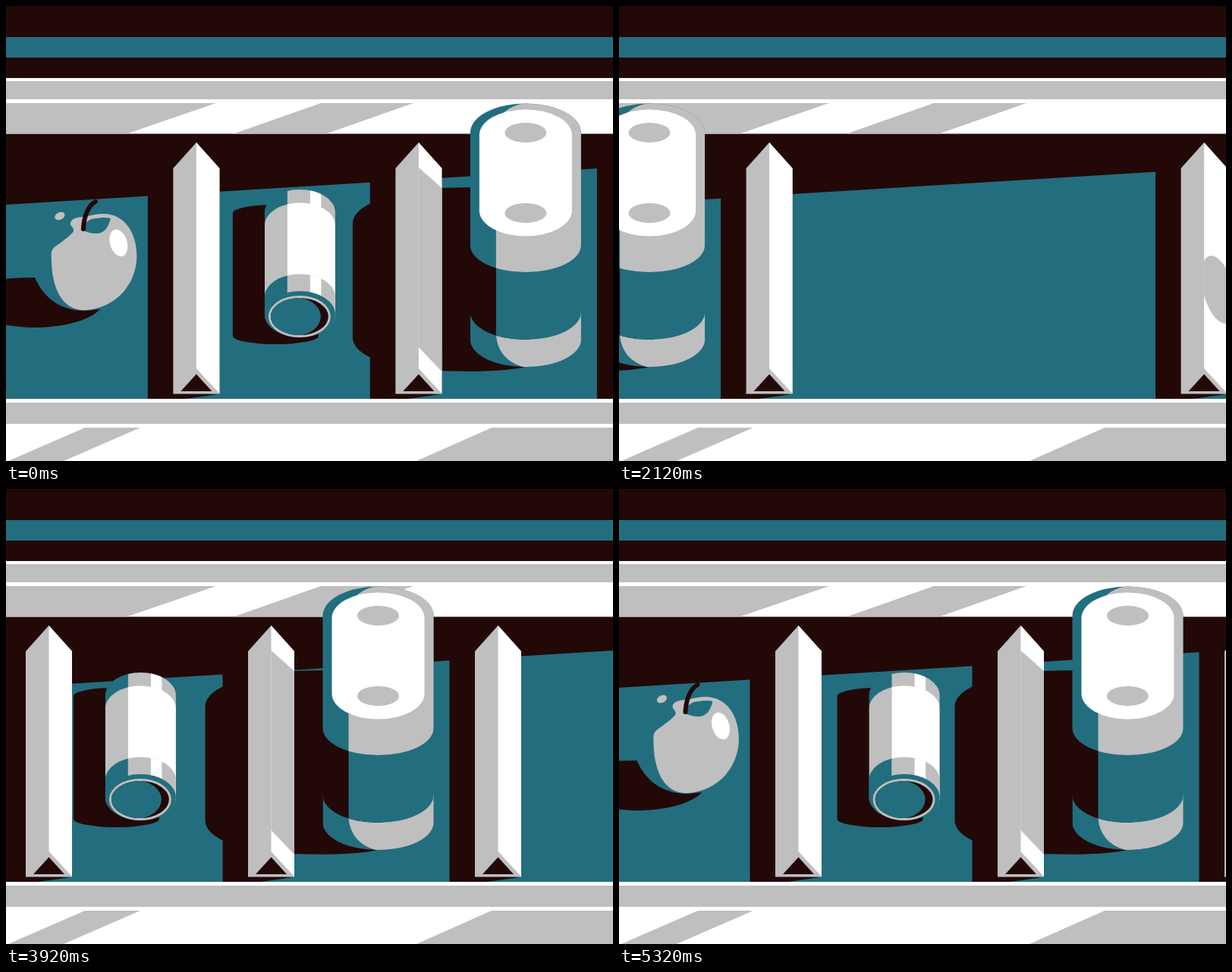
These frames come from a looping animation (800x600 px, 5.36 s). An HTML page with a canvas:

```html
<!DOCTYPE html>
<html lang="en">
<head>
<meta charset="utf-8">
<title>Checkout belt</title>
<style>
html, body { margin: 0; width: 100%; height: 100%; overflow: hidden; background: #230808; }
canvas { display: block; width: 800px; height: 600px; }
</style>
</head>
<body>
<canvas id="stage" width="800" height="600"></canvas>
<script>
const g = document.getElementById('stage').getContext('2d');
const DARK = '#230808', TEAL = '#226e7e', GRAY = '#bfbfbf', WHITE = '#ffffff';
const LOOP = 5360, TICK = 40, REST = 4480;
const MOVE = 393.5, EXIT = 710, ENTER = 356.5, SLIP = 84;

const part = (t, from, to) => Math.min(1, Math.max(0, (t - from) / (to - from)));

// Speeds up over the share a, cruises, slows down over the share b
function ramp(t, from, to, a = .5, b = .5) {
  const u = part(t, from, to), v = 1 / (1 - (a + b) / 2);
  if (u < a) return v * u * u / 2 / a;
  if (u > 1 - b) return 1 - v * (1 - u) ** 2 / 2 / b;
  return v * (u - a / 2);
}

// Belt position, slide of the can and roll of the apple
function pose(t) {
  const move = ramp(t, -789, 756, .32, .26);
  const exit = ramp(t, 1690, 2240, .5, .3);
  const enter = 1 - (1 - part(t, 2240, 3500)) ** 1.79;
  const rollBack = ramp(t, 940, 1680), rollAgain = ramp(t, 3624, 4364);
  const slip = ramp(t, 1640, 3440, .32, .26);
  return {
    x: 56.5 + MOVE * move + EXIT * exit + ENTER * enter,
    can: 178 - SLIP * (move - rollBack + slip - rollAgain),
    apple: -10 * (rollBack - exit)
  };
}

function rect(color, x, y, w, h) {
  g.fillStyle = color;
  g.fillRect(x, y, w, h);
}
function poly(color, ...p) {
  g.fillStyle = color;
  g.beginPath();
  for (let i = 0; i < p.length; i += 2) g.lineTo(p[i], p[i + 1]);
  g.fill();
}
function shape(color, d) {
  g.fillStyle = color;
  g.fill(new Path2D(d));
}
function oval(color, x, y, rx, ry, turn = 0) {
  g.fillStyle = color;
  g.beginPath();
  g.ellipse(x, y, rx, ry, turn, 0, 7);
  g.fill();
}
// Upright tube between two ellipse centres
function tubePath(x, top, bottom, rx, ry) {
  g.beginPath();
  g.ellipse(x, top, rx, ry, 0, Math.PI, 2 * Math.PI);
  g.ellipse(x, bottom, rx, ry, 0, 0, Math.PI);
  g.closePath();
}
function tube(color, ...size) {
  g.fillStyle = color;
  tubePath(...size);
  g.fill();
}
function inTube(size, draw) {
  g.save();
  tubePath(...size);
  g.clip();
  draw();
  g.restore();
}
function shifted(x, draw) {
  g.save();
  g.translate(x, 0);
  draw();
  g.restore();
}

function glare(left, right, top, bottom, lean) {
  poly(GRAY, left, top, right, top, right - lean, bottom, left - lean, bottom);
}
function backdrop() {
  rect(DARK, 0, 0, 800, 600);
  rect(TEAL, 0, 41, 800, 27);
  rect(WHITE, 0, 95, 800, 73.5);
  rect(GRAY, 0, 99, 800, 24);
  glare(-100, 277, 128, 168.5, 118);
  glare(415, 537, 128, 168.5, 115);
  poly(TEAL, 0, 262, 800, 213, 800, 518, 0, 518);
  rect(WHITE, 0, 518, 800, 82);
  rect(GRAY, 0, 523, 800, 28);
  glare(104, 177, 556, 600, 101);
  glare(640, 920, 556, 600, 99);
}

function barShadow() {
  rect(DARK, -64, 200, 40, 318);
  poly(DARK, -64, 518, -14, 518, 29, 512, -30, 508);
}
function bar(shaded) {
  poly(GRAY, 0, 180, 30.5, 214, 30.5, 511.5, -30.5, 511.5, -30.5, 214);
  poly(WHITE, 0, 180, 30.5, 214, 30.5, 511, 0, 478);
  if (shaded) poly(GRAY, 0, 213, 30.5, 240, 30.5, 482, 0, 450);
  poly(DARK, 0, 485.5, 20.5, 508, -20.5, 508);
}
// Casts a shadow on the lit face of a bar
function onFace(barX, x, draw) {
  g.save();
  g.beginPath();
  g.rect(barX, 214, 30.5, 280);
  g.clip();
  shifted(x, draw);
  g.restore();
}

function appleShadow() {
  shape(DARK, 'M-78 358 C-68 380 -50 401 -12 402 L8 400 C-8 416 -42 424 -82 424 ' +
    'Q-118 422 -132 416 L-160 400 L-140 364 Q-118 358 -78 358Z');
}
function apple(turn) {
  g.translate(0, 338);
  g.rotate(turn);
  g.translate(0, -338);
  shape(GRAY, 'M-56 332 C-57 322 -54 319 -48 315 C-38 308 -29 301 -27 297 ' +
    'C-26 291 -31 292 -31 286 C-29 279 -20 278 -11 278 C-4 276 4 274 14 274 ' +
    'C40 275 56.5 298 56.5 330 C56 365 32 397 -10 401 C-44 403 -56 368 -56 332Z');
  shape(TEAL, 'M-14 296 C-13 285 -6 280 4 280 Q14 278 22 280 C19 293 13 300 3 300 Q-6 300 -14 296Z');
  oval(GRAY, -45, 277, 7, 4.8, -.45);
  oval(WHITE, 32.5, 312.5, 11.3, 18.2, -.28);
  g.strokeStyle = DARK;
  g.lineWidth = 6;
  g.lineCap = 'round';
  g.stroke(new Path2D('M-14 294 C-13 276 -7 263 2 258'));
}

function canStripes() {
  rect(TEAL, -47, 240, 30.5, 200);
  rect(GRAY, -16.5, 240, 64, 200);
  rect(WHITE, 13.5, 240, 14.5, 200);
}
function can() {
  inTube([0, 272, 406, 46.5, 30], () => {
    canStripes();
    inTube([0, 289.5, 450, 46.5, 30], () => {
      rect(GRAY, -47, 250, 31, 200);
      rect(WHITE, -16.5, 250, 64, 200);
    });
    inTube([0, 383.5, 450, 46.5, 30], canStripes);
  });
  oval(TEAL, 0, 406.5, 46.5, 30.5);
  oval(GRAY, -.5, 409.5, 41, 27.5);
  inTube([-.5, 409.5, 409.5, 38, 24.5], () => {
    rect(DARK, -47, 380, 94, 60);
    oval(TEAL, -7, 409.5, 34.5, 25.5);
  });
}

function rollShadow() {
  tube(DARK, -155, 287, 437, 73, 36);
  shape(DARK, 'M-115 240 L-70 239 L0 300 L4 475 Q-30 484 -115 481Z');
}
function roll() {
  const split = -39;
  // Lower band
  inTube([0, 404, 440, 73, 36], () => {
    rect(TEAL, -73, 360, 146, 120);
    shape(GRAY, 'M-39 400 L-39 434 Q-36 468 0 477 L80 477 L80 400Z');
  });
  // Middle band
  inTube([0, 300, 404, 73, 36], () => {
    rect(DARK, -74, 260, 80, 190);
    rect(TEAL, split, 260, 120, 190);
  });
  // Upper body
  inTube([0, 167, 315, 73, 38.5], () => {
    inTube([0, 100, 315, 73.5, 36], () => {
      rect(TEAL, -74, 120, 148, 240);
      shape(GRAY, 'M-39 360 L-39 152 Q-24 130 2 128 L80 120 L80 360Z');
    });
  });
  tube(WHITE, 0, 170, 270, 61, 33.5);
  for (const y of [167, 273]) oval(GRAY, 0, y, 27.5, 13);
}

function goods(x, p) {
  const bars = [x - 295, x, x + 293, x + 592];
  const appleX = x - 135 + p.apple, canX = x + p.can, rollX = x + 434;
  shifted(appleX, appleShadow);
  shifted(canX, () => tube(DARK, -32, 273, 435, 56.5, 11));
  shifted(rollX, rollShadow);
  for (const b of bars) shifted(b, barShadow);
  bars.forEach((b, i) => shifted(b, () => bar(i === 2)));
  onFace(bars[0], appleX, () => oval(GRAY, -140, 374, 20, 46, -.25));
  onFace(bars[1], canX, () => tube(GRAY, -40, 263, 434, 41, 11));
  shifted(appleX, () => apple(p.apple / 70));
  shifted(canX, can);
  shifted(rollX, roll);
}

function frame() {
  let t = Math.floor(performance.now() % LOOP / TICK) * TICK;
  if (t > REST) t -= LOOP;
  const p = pose(t);
  backdrop();
  goods(p.x, p);
  goods(p.x - MOVE - EXIT - ENTER, p);
  requestAnimationFrame(frame);
}
frame();
</script>
</body>
</html>
```
